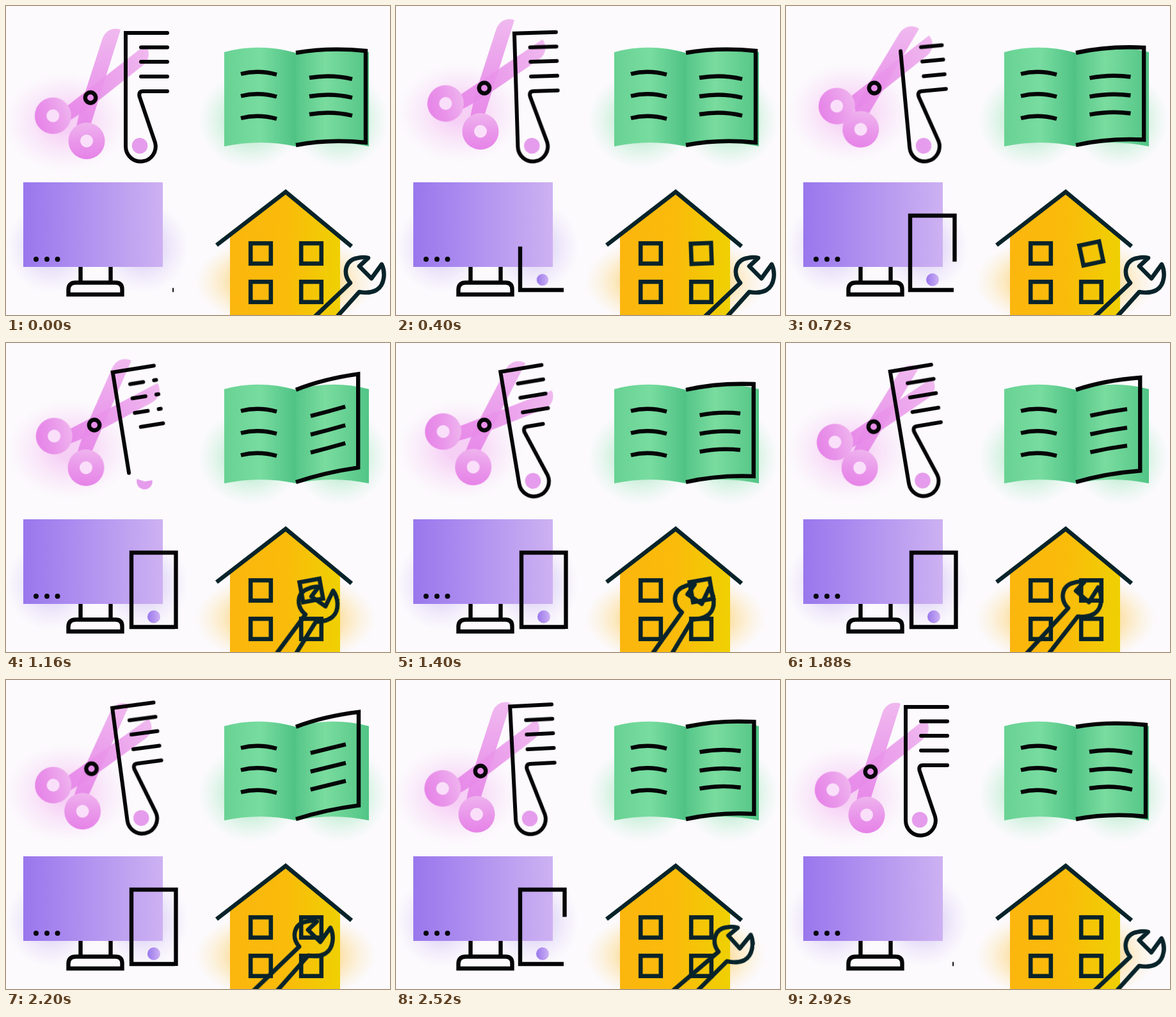
Recreate the animation shown at these times as an HTML page. Size 600 by 482 pixels, loop 2.96 s.

```html
<!DOCTYPE html>
<html lang="en">
<head>
<meta charset="utf-8">
<title>Icons</title>
<style>
html, body { margin: 0; width: 100%; height: 100%; overflow: hidden; background: #fcfafd; }
svg { display: block; width: 600px; height: 482px; }
.ink { fill: none; stroke: #050507; stroke-width: 6.4; }
.comb { stroke-width: 6; stroke-linecap: round; }
.dark { fill: none; stroke: #08232a; stroke-width: 6.6; }
.anim { animation: 2960ms linear infinite; }

/* scissors */
.snipper { animation-name: snipper; animation-timing-function: ease-in-out; }
.blade-a { animation-name: blade-a; animation-timing-function: ease-in-out; }
.blade-b { animation-name: blade-b; animation-timing-function: ease-in-out; }
@keyframes snipper {
  0%, 100% { transform: translate(132px, 143px); }
  14% { transform: translate(138px, 128px); }
  53% { transform: translate(138px, 128px); }
  63.5% { transform: translate(137px, 130.5px); animation-timing-function: ease-out; }
  85.1% { transform: translate(132px, 142px); }
  98.6% { transform: translate(132px, 143px); }
}
@keyframes blade-a {
  0%, 98.6%, 100% { transform: rotate(0deg); }
  13.5% { transform: rotate(4deg); }
  24.3% { transform: rotate(0deg); animation-timing-function: ease-in; }
  39.2% { transform: rotate(10.3deg); animation-timing-function: ease-out; }
  47.3% { transform: rotate(16.7deg); }
  63.5% { transform: rotate(4deg); }
  85.1% { transform: rotate(1deg); }
}
@keyframes blade-b {
  0%, 13.5%, 85.1%, 100% { transform: rotate(0deg); }
  24.3% { transform: rotate(13.2deg); }
  33.8% { transform: rotate(3deg); }
  39.2% { transform: rotate(6deg); }
  47.3% { transform: rotate(9.7deg); }
  53% { transform: rotate(2deg); }
  63.5% { transform: rotate(13.7deg); }
}

/* comb: a gap runs along every stroke while it tilts */
.drift { animation-name: drift; }
.tilt { animation-name: tilt; animation-timing-function: ease-in-out; transform-origin: 209px 218px; }
.gap { stroke-dasharray: 100 42; animation-name: gap; }
.gap.dot { animation-name: dot-gap; }
@keyframes drift {
  0%, 98.6%, 100% { transform: translate(0, 0); }
  24.3% { transform: translate(6px, 0); }
  39.2% { transform: translate(7.5px, -2px); }
  47.3% { transform: translate(5px, -3px); }
  63.5% { transform: translate(4.5px, -3.5px); }
  85.1% { transform: translate(0, -2px); }
}
@keyframes tilt {
  0%, 98.6%, 100% { transform: rotate(0deg); }
  45.3%, 63.5% { transform: rotate(-9.5deg); }
}
@keyframes gap {
  0%, 19.6% { stroke-dashoffset: 142; }
  24.3% { stroke-dashoffset: 122; }
  39.2% { stroke-dashoffset: 50; }
  47.3% { stroke-dashoffset: 3; }
  48.2%, 100% { stroke-dashoffset: 0; }
}
@keyframes dot-gap {
  0%, 24.3% { stroke-dashoffset: 142; }
  39.2% { stroke-dashoffset: 48; }
  47.3%, 100% { stroke-dashoffset: 0; }
}

/* book */
.page { animation-name: page; animation-timing-function: ease-in-out; }
.rule { animation-name: rule; animation-timing-function: ease-in-out; }
@keyframes page {
  0%, 17.6%, 52.7%, 92.5%, 100% { d: path("M453 73Q505 64 562 70V213Q505 207 453 217"); }
  37.8%, 69.7% { d: path("M453 73Q495 56 550 48V194Q497 202 453 217"); }
}
@keyframes rule {
  0%, 17.6%, 52.7%, 92.5%, 100% { d: path("M474 112Q508 106 541 114"); }
  37.8%, 69.7% { d: path("M476 114Q503 107 530 99"); }
}

/* phone */
.phone { animation-name: phone; }
.frame { stroke-dasharray: 100 200; animation-name: frame; animation-timing-function: ease-in-out; }
.button { animation-name: button; animation-timing-function: ease-in-out; transform-origin: 231px 427px; }
@keyframes phone {
  0%, 24.4%, 85.1%, 100% { transform: translate(-2px, 0); }
  33%, 78% { transform: translate(0, 0); }
}
@keyframes frame {
  0%, 98.6%, 100% { stroke-dashoffset: 99.5; }
  32.4%, 79% { stroke-dashoffset: 0; }
}
@keyframes button {
  0%, 98%, 100% { transform: scale(0); }
  17%, 87% { transform: scale(1); }
}

/* wrench and loose window */
.carry { animation-name: carry; animation-timing-function: ease-in-out; }
.turn { animation-name: turn; animation-timing-function: ease-in-out; }
.loose { animation-name: loose; animation-timing-function: ease-in-out; transform-origin: 477px 386px; }
@keyframes carry {
  0%, 24.3%, 100% { transform: translate(561px, 420px); }
  46.6% { transform: translate(467px, 404px); }
  63.5% { transform: translate(463px, 400px); }
}
@keyframes turn {
  0%, 24.3%, 100% { transform: rotate(0deg); }
  39.2% { transform: rotate(-10deg); }
  47.3% { transform: rotate(-11deg); }
  63.5% { transform: rotate(-4deg); }
  85.1% { transform: rotate(3deg); }
}
@keyframes loose {
  0%, 10%, 61%, 100% { transform: rotate(0deg); }
  22% { transform: rotate(-12deg); }
  47.3% { transform: rotate(-10deg); }
}
</style>
</head>
<body>
<svg viewBox="0 0 600 482">
  <defs>
    <radialGradient id="pinkGlow">
      <stop offset=".2" stop-color="#ee94ea" stop-opacity=".42"/>
      <stop offset=".65" stop-color="#f2aef0" stop-opacity=".2"/>
      <stop offset="1" stop-color="#f6c8f5" stop-opacity="0"/>
    </radialGradient>
    <radialGradient id="greenGlow">
      <stop offset=".3" stop-color="#62d794" stop-opacity=".45"/>
      <stop offset="1" stop-color="#a5ecc0" stop-opacity="0"/>
    </radialGradient>
    <radialGradient id="violetGlow">
      <stop offset=".2" stop-color="#a88bee" stop-opacity=".42"/>
      <stop offset="1" stop-color="#cdbcf6" stop-opacity="0"/>
    </radialGradient>
    <radialGradient id="amberGlow">
      <stop offset=".5" stop-color="#fbc23c" stop-opacity=".6"/>
      <stop offset="1" stop-color="#fde3a0" stop-opacity="0"/>
    </radialGradient>
    <linearGradient id="pink" x1="0" y1="1" x2="0" y2="0">
      <stop offset="0" stop-color="#e683e8"/>
      <stop offset=".45" stop-color="#e995ea"/>
      <stop offset="1" stop-color="#efb3ee"/>
    </linearGradient>
    <linearGradient id="leftPage">
      <stop offset="0" stop-color="#68d293"/>
      <stop offset=".5" stop-color="#78dca0"/>
      <stop offset="1" stop-color="#4fc284"/>
    </linearGradient>
    <linearGradient id="rightPage">
      <stop offset="0" stop-color="#55c688"/>
      <stop offset=".4" stop-color="#7adc9f"/>
      <stop offset="1" stop-color="#52c586"/>
    </linearGradient>
    <linearGradient id="violet">
      <stop offset="0" stop-color="#9977ed"/>
      <stop offset="1" stop-color="#cdb1f2"/>
    </linearGradient>
    <linearGradient id="amber">
      <stop offset="0" stop-color="#fcb60e"/>
      <stop offset=".5" stop-color="#fabb0a"/>
      <stop offset="1" stop-color="#efd003"/>
    </linearGradient>
    <g id="blade">
      <path d="M47-106C36-110 23-106 18-90L-13 6Q-18 24-22 46L-1 46 1 40Z" fill="url(#pink)" opacity=".92"/>
      <circle cx="-6" cy="67.500" r="28.5" fill="url(#pink)"/>
      <circle cx="-6" cy="67.500" r="10" fill="#fadffa"/>
    </g>
    <rect id="pane" x="-15.8" y="-15.8" width="31.6" height="31.6"/>
  </defs>

  <g class="anim snipper">
    <ellipse cx="-38" cy="38" rx="98" ry="78" fill="url(#pinkGlow)"/>
    <g class="anim blade-b"><use href="#blade"/></g>
    <g class="anim blade-a"><use href="#blade" transform="matrix(-.3486 -.937 -.937 .3486 2.5 -1)"/></g>
    <circle class="ink" r="8.2"/>
  </g>

  <g class="anim drift">
    <g class="anim tilt">
      <circle class="anim gap dot" cx="209" cy="218" r="6.1" pathLength="90" fill="none" stroke="#e59cec" stroke-width="12.4"/>
      <g class="ink comb">
        <path class="anim gap" pathLength="100" d="M252 42H187V219A23.4 23.4 0 1 0 233 213L208.500 141Q207 133 214 133H252"/>
        <path class="anim gap" pathLength="100" d="M211 64.500H252"/>
        <path class="anim gap" pathLength="100" d="M211 87H252"/>
        <path class="anim gap" pathLength="100" d="M211 110H252"/>
      </g>
    </g>
  </g>

  <g fill="url(#greenGlow)">
    <ellipse cx="382" cy="178" rx="82" ry="76"/>
    <ellipse cx="522" cy="178" rx="76" ry="76"/>
  </g>
  <path d="M341 72Q395 57 453 73V219Q398 207 341 219Z" fill="url(#leftPage)"/>
  <path d="M453 73Q510 57 567 72V219Q510 207 453 219Z" fill="url(#rightPage)"/>
  <g class="ink">
    <path d="M367 106Q394 99 423 107M367 140.500Q394 133.500 423 141.500M367 175Q394 168 423 176"/>
    <path class="anim page" d="M453 73Q505 64 562 70V213Q505 207 453 217"/>
    <path class="anim rule" d="M474 112Q508 106 541 114"/>
    <g transform="translate(0 29)"><path class="anim rule" d="M474 112Q508 106 541 114"/></g>
    <g transform="translate(0 57)"><path class="anim rule" d="M474 112Q508 106 541 114"/></g>
  </g>

  <g fill="url(#violetGlow)">
    <ellipse cx="70" cy="376" rx="70" ry="72"/>
    <ellipse cx="214" cy="376" rx="72" ry="72"/>
  </g>
  <rect x="27" y="275" width="218" height="132" fill="url(#violet)"/>
  <g fill="#050507">
    <circle cx="47" cy="395" r="4"/>
    <circle cx="64" cy="395" r="4"/>
    <circle cx="80.500" cy="395" r="4"/>
  </g>
  <path class="ink" d="M116.500 407V431M163.500 407V431M97.500 450V442Q98 431.500 109 431.500H171Q181.500 431.500 181.500 442V450Z"/>
  <g class="anim phone">
    <circle class="anim button" cx="231" cy="427" r="10" fill="url(#violet)"/>
    <path class="ink anim frame" pathLength="100" d="M264 443H196V327H265.500V446"/>
  </g>

  <ellipse cx="437" cy="430" rx="142" ry="74" fill="url(#amberGlow)"/>
  <path d="M350 357L437 290 522 358V482H350Z" fill="url(#amber)"/>
  <g class="dark">
    <path d="M329 373L437 290 540 375"/>
    <use href="#pane" x="398" y="386"/>
    <use href="#pane" x="398" y="446"/>
    <use href="#pane" x="477" y="446"/>
    <g class="anim loose"><use href="#pane" x="477" y="386"/></g>
    <g class="anim carry">
      <path class="anim turn" stroke-linejoin="round" d="M-118 102L-23 12C-35-2-32-24-11-27Q-3-29 5-27L-9-14 10 5 26-17C32-5 31 15 18 23Q7 29-9 26L-81 106"/>
    </g>
  </g>
</svg>
</body>
</html>
```
